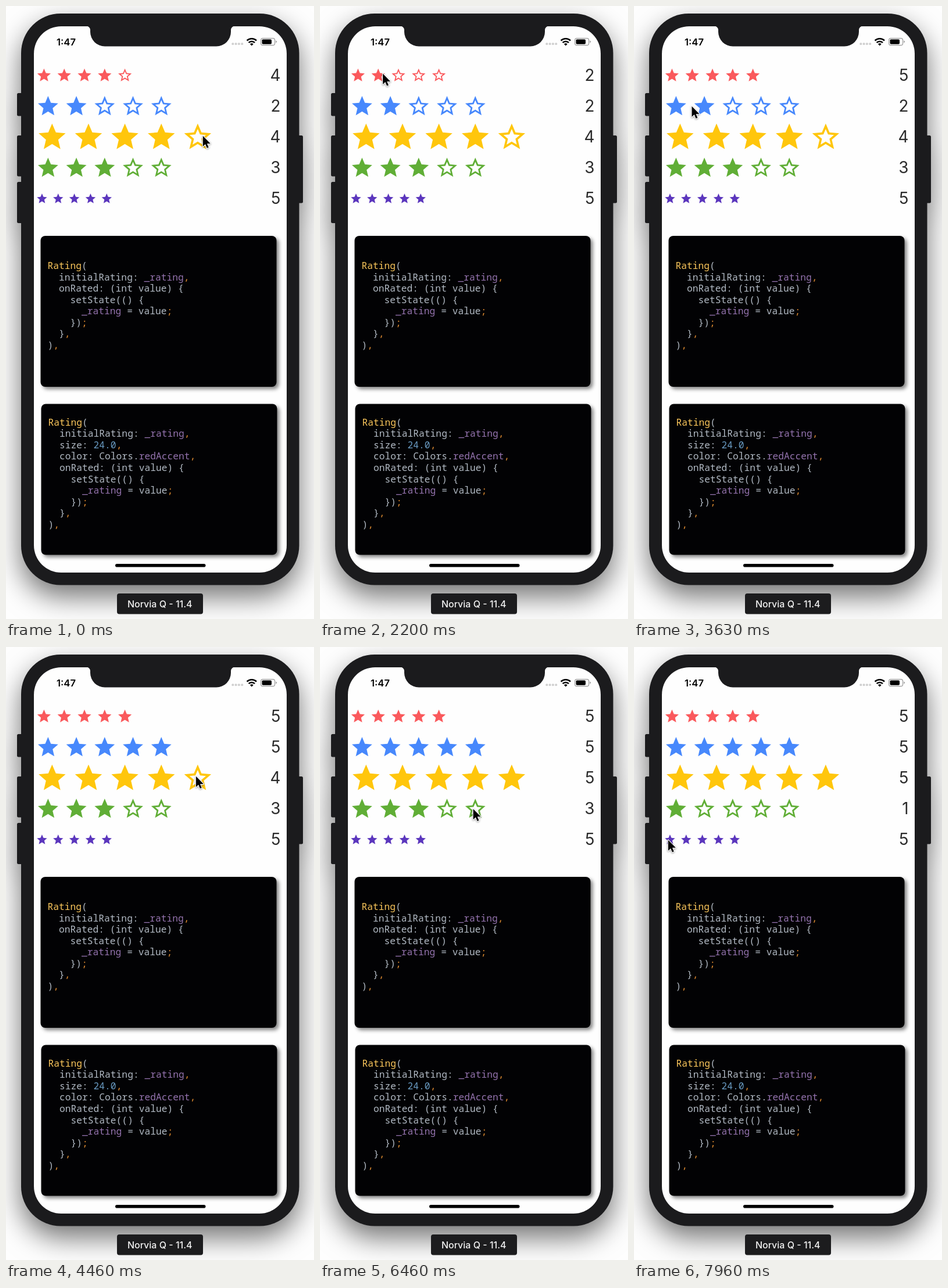
An HTML page for the animation above (8 s loop, 530 by 1056 pixels).

```html
<!DOCTYPE html>
<html lang="en">
<head>
<meta charset="utf-8">
<title>Star rating demo</title>
<style>
  html, body { margin: 0; width: 100%; height: 100%; overflow: hidden; background: #fefefe; }
  svg { display: block; width: 530px; height: 1056px; }
  text { white-space: pre; font-family: Inter, "Open Sans", sans-serif; }
  .phone { fill: #1b1b1d; filter: drop-shadow(0 20px 24px rgba(0, 0, 0, .55)); }
  .bezel { fill: #1b1b1d; }
  .screen { fill: #fefefe; }
  .clock { font-size: 16.6px; font-weight: 600; text-anchor: middle; }
  .label { font-size: 16px; font-weight: 500; text-anchor: middle; fill: #f2f2f2; }
  .value { font-size: 27.84px; text-anchor: end; fill: #2b2b2b; }
  .card { fill: #020204; filter: drop-shadow(4px 4px 3px rgba(0, 0, 0, .48)); }
  .code text { font: 16.27px "Noto Sans Mono", "DejaVu Sans Mono", monospace; fill: #b2bac4; }
  .code .call { fill: #fcc75b; }
  .code .field { fill: #9473ae; }
  .code .mark { fill: #dd8a30; }
  .code .num { fill: #6a9cc4; }
  .cursor { filter: drop-shadow(0 1.5px 1.5px rgba(0, 0, 0, .4)); }
</style>
</head>
<body>
<svg viewBox="0 0 530 1056">
  <g class="phone">
    <rect x="19" y="150" width="12" height="39.5" rx="2.5"/>
    <rect x="19" y="223" width="12" height="70.5" rx="2.5"/>
    <rect x="19" y="303" width="12" height="71" rx="2.5"/>
    <rect x="499" y="223" width="12" height="116.5" rx="2.5"/>
    <rect x="26" y="13" width="478.5" height="984.5" rx="68"/>
  </g>
  <rect class="screen" x="48" y="35" width="435" height="941" rx="47"/>
  <path class="bezel" d="M138 34.5a7 7 0 0 1 7 7v3a25 25 0 0 0 25 25h192a25 25 0 0 0 25-25v-3a7 7 0 0 1 7-7z"/>

  <text class="clock" x="103.5" y="67.5">1:47</text>
  <g fill="#cfcfcf">
    <circle cx="390.3" cy="65.3" r="2"/><circle cx="395.6" cy="65.3" r="2"/>
    <circle cx="400.9" cy="65.3" r="2"/><circle cx="406.2" cy="65.3" r="2"/>
  </g>
  <g fill="none" stroke="#000" stroke-width="2.6">
    <path d="M414.6 59.7a11.6 11.6 0 0 1 16.4 0"/>
    <path d="M417.6 63.2a7.2 7.2 0 0 1 10.4 0"/>
  </g>
  <path d="M422.8 68.6l-2.9-3a4.2 4.2 0 0 1 5.8 0z"/>
  <rect x="438.6" y="55.6" width="24" height="12" rx="3.4" fill="none" stroke="#9a9a9a" stroke-width="1.2"/>
  <rect x="440.5" y="57.5" width="16.5" height="8.2" rx="1.8"/>
  <path d="M464.3 59.6q1.8.6 1.8 2t-1.8 2z" fill="#9a9a9a"/>

  <g id="rows"></g>
  <g id="cards" class="code"></g>
  <rect x="188" y="961" width="155.5" height="5.6" rx="2.8"/>
  <rect x="191" y="1012" width="148" height="35.5" rx="4" fill="#1c1c1e"/>
  <text class="label" x="264.7" y="1036.3">Norvia Q - 11.4</text>

  <g id="cursor" class="cursor">
    <path d="M.8 1.2v18.4l4.2-4 2.8 6.6 2.9-1.2-2.8-6.5h5.9z" stroke="#fff" stroke-width="2.2"
      stroke-linejoin="round" paint-order="stroke"/>
  </g>
</svg>
<script>
const LOOP = 8000, TICK = 100 / 3, PT = 1.16, LEFT = 48;
const FULL = "M12 17.27L18.18 21l-1.64-7.03L22 9.24l-7.19-.61L12 2 9.19 8.63 2 9.24l5.46 4.73L5.82 21z";
const HOLE = "M12 15.4l-3.76 2.27 1-4.28-3.32-2.88 4.38-.38L12 6.1l1.71 4.04 4.38.38-3.32 2.88 1 4.28z";
const $ = id => document.getElementById(id);

// moves: start, end, star reached. The pointer sinks a little with each move,
// and the rating follows it from `press` to the row's last move.
const rows = [
  { size: 24, color: "#fa595c", start: 4, press: 660, dy: -4, sink: 0,
    moves: [[0, 466, 4.22], [866, 1166, 3.72], [1400, 2033, 1.7], [2166, 2633, 4.57]] },
  { size: 36, color: "#4788fc", start: 2, press: 3200, dy: -1, sink: 0,
    moves: [[2766, 2933, 4.3], [3000, 3616, 1.04], [3616, 4033, 4.3]] },
  { size: 48, color: "#ffc60c", start: 4, press: 4700, dy: -4, sink: 8,
    moves: [[4033, 4433, 4.44], [4466, 5233, -.2], [5466, 6066, 4.58]] },
  { size: 36, color: "#60ae36", start: 3, press: 6610, dy: -1, sink: 4,
    moves: [[6166, 6466, 4.41], [6533, 6766, .45], [6766, 7000, 4.31], [7000, 7366, -.29]] },
  { size: 18, color: "#5b36bd", start: 5, press: LOOP, dy: -10, sink: 9.5,
    moves: [[7600, 7800, 1.4], [7800, 7966, .36]] }
];
rows.forEach((row, i) => {
  row.y = 119.4 + 53.1 * i;
  row.pitch = (row.size + 6) * PT;
  row.end = row.moves.at(-1)[1];
});

const moves = rows.flatMap(row => row.moves.map(([from, to, star], i) =>
  ({ from, to, x: LEFT + star * row.pitch, y: row.y + row.dy + i * row.sink })));

const ease = u => u < .5 ? 4 * u ** 3 : 1 - 4 * (1 - u) ** 3;

function pointer(t) {
  let x = 338, y = 222.5;
  for (const m of moves) {
    if (t <= m.from) break;
    const s = ease(Math.min(1, (t - m.from) / (m.to - m.from)));
    x += (m.x - x) * s;
    y += (m.y - y) * s;
  }
  return { x, y };
}

function rating({ start, press, end, pitch }, t) {
  if (t < press) return start;
  const star = Math.ceil((pointer(Math.min(t, end)).x - LEFT) / pitch);
  return Math.max(1, Math.min(5, star));
}

function buildRow(row) {
  const side = row.size * PT;
  let html = "";
  for (let i = 0; i < 5; i++) {
    const x = LEFT + row.pitch * (i + .5) - side / 2;
    html += `<path fill-rule="evenodd" transform="translate(${x} ${row.y - side / 2}) scale(${side / 24})"/>`;
  }
  $("rows").insertAdjacentHTML("beforeend",
    `<g fill="${row.color}">${html}<text class="value" x="472.5" y="${row.y + 9.6}"></text></g>`);
  const g = $("rows").lastElementChild;
  row.stars = [...g.querySelectorAll("path")];
  row.label = g.querySelector("text");
}

const paint = line => line.replace(/(Rating(?=\())|(_rating|redAccent)|([,;])|(24\.0)/g,
  (m, call, field, mark) =>
    `<tspan class="${call ? "call" : field ? "field" : mark ? "mark" : "num"}">${m}</tspan>`);

function buildCard(x, y, base, extra) {
  const lines = ["Rating(", "  initialRating: _rating,", ...extra, "  onRated: (int value) {",
    "    setState(() {", "      _rating = value;", "    });", "  },", "),"];
  $("cards").insertAdjacentHTML("beforeend",
    `<rect class="card" x="${x}" y="${y}" width="406" height="260" rx="8"/>` +
    lines.map((l, i) => `<text x="${x + 12}" y="${base + i * 19.55}">${paint(l)}</text>`).join(""));
}

function draw() {
  const now = performance.now() % LOOP;
  const t = Math.floor((now + 7) / TICK) * TICK;
  for (const row of rows) {
    const n = rating(row, t);
    if (n !== row.shown) {
      row.shown = n;
      row.label.textContent = n;
      row.stars.forEach((s, i) => s.setAttribute("d", i < n ? FULL : FULL + HOLE));
    }
  }
  const { x, y } = pointer(t);
  $("cursor").setAttribute("transform", `translate(${x} ${y})`);
  requestAnimationFrame(draw);
}

rows.forEach(buildRow);
buildCard(59.5, 396, 453, []);
buildCard(60.5, 685.5, 722.8, ["  size: 24.0,", "  color: Colors.redAccent,"]);
draw();
</script>
</body>
</html>
```
